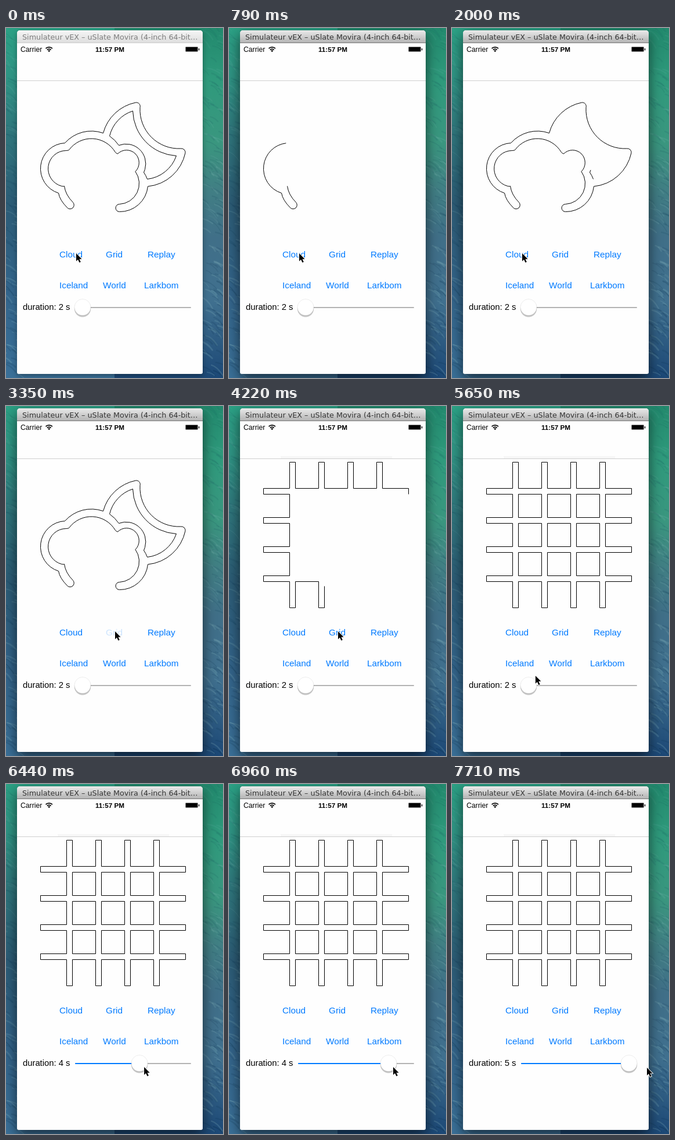
Write an HTML page that moves like this. It is 374 by 601 pixels and loops after 8000 ms.

```html
<!DOCTYPE html>
<html lang="fr">
<head>
<meta charset="utf-8">
<style>
html, body { margin: 0; width: 100%; height: 100%; overflow: hidden; background: #2a5574; }
svg { position: absolute; left: 0; top: 0; }
#win { position: absolute; left: 19px; top: 4px; width: 320px; height: 590px; border-radius: 5px 5px 3px 3px;
  background: #fefefe; box-shadow: 0 3px 9px rgba(0,0,0,.35); overflow: hidden; }
#bar { height: 21px; border-bottom: 1px solid #ccc; background: linear-gradient(#f6f6f6, #dedede); }
#win.active { box-shadow: 0 8px 22px rgba(0,0,0,.6); }
#win.active #bar { border-color: #777; background: linear-gradient(#eaeaea, #b4b4b4); }
text { font-family: "Liberation Sans", Arial, sans-serif; font-size: 15.3px; }
#title { font-family: "DejaVu Sans", sans-serif; font-size: 12.75px; }
#buttons { fill: #007aff; }
#cloud, #grid { fill: none; stroke: #000; }
</style>
</head>
<body>
<svg width="374" height="601">
  <defs>
    <linearGradient id="left" x2="0" y2="1">
      <stop stop-color="#2ba084"/><stop offset=".14" stop-color="#2f9484"/><stop offset=".3" stop-color="#2f767c"/>
      <stop offset=".5" stop-color="#2c5c76"/><stop offset=".75" stop-color="#33648a"/><stop offset="1" stop-color="#3a7098"/>
    </linearGradient>
    <linearGradient id="right" x2="0" y2="1">
      <stop stop-color="#22896d"/><stop offset=".15" stop-color="#2f9a7c"/><stop offset=".33" stop-color="#3a967f"/>
      <stop offset=".46" stop-color="#417f84"/><stop offset=".6" stop-color="#406f88"/><stop offset=".78" stop-color="#40708f"/>
      <stop offset="1" stop-color="#1c4876"/>
    </linearGradient>
  </defs>
  <rect width="187" height="601" fill="url(#left)"/>
  <rect x="187" width="187" height="601" fill="url(#right)"/>
  <g id="waves" fill="none" stroke-linecap="round"/>
</svg>
<div id="win"><div id="bar"></div></div>
<svg width="374" height="601">
  <text id="title" x="28" y="20">Simulateur vEX – uSlate Movira (4-inch 64-bit…</text>
  <text x="25" y="41" style="font-size:12.2px">Carrier</text>
  <g fill="none" stroke="#000" stroke-width="1.8">
    <path d="M68.5 35.2a8 8 0 0 1 11.4 0M70.8 37.6a4.8 4.8 0 0 1 6.8 0"/>
    <path d="M74.2 41.2l-2-2.2a3 3 0 0 1 4 0z" fill="#000" stroke="none"/>
  </g>
  <text x="154" y="41" style="font-size:11.7px;font-weight:bold">11:57 PM</text>
  <rect x="309.5" y="32.5" width="21" height="8" rx="1" fill="#000" stroke="#888"/>
  <rect x="331.7" y="35" width="1.6" height="3.4" fill="#222"/>
  <rect id="smudge" x="89" y="86" width="192" height="4" fill="#f7f7f7"/>
  <path d="M19 90.5h320" stroke="#cfcfcf"/>

  <g id="cloud" transform="translate(.5 .5)">
    <path d="M100 271Q102 286 115 299A6.5 6.5 0 0 1 105 308Q92 295 90 283A44 44 0 0 1 101 197A61 61 0 0 1 167 180
      A73 73 0 0 1 223 127.5A6.7 6.7 0 0 1 230.5 136A67 67 0 0 0 301 206.5A6.7 6.7 0 0 1 308.5 214A73 73 0 0 1 244 271.5
      A48.5 48.5 0 0 1 195 315A6.5 6.5 0 0 1 195 302A35.5 35.5 0 0 0 222.5 246A21.5 21.5 0 0 0 192 215.5
      Q190 215 188 213A48 48 0 0 0 108 209Q106 210 103 210A31 31 0 0 0 95.3 271Q99 272 100 271Z"/>
    <path d="M243 259A48.5 48.5 0 0 0 237 247.5L239 242A34 34 0 0 0 194 201A61 61 0 0 0 178 185A60 60 0 0 1 218 142
      A79.5 79.5 0 0 0 293 219A60 60 0 0 1 243 259Z"/>
  </g>
  <g id="grid"/>

  <g id="buttons">
    <text id="cloudBtn" x="92" y="394">Cloud</text>
    <text id="gridBtn" x="172" y="394">Grid</text>
    <text x="244" y="394">Replay</text>
    <text x="92" y="447">Iceland</text>
    <text x="167" y="447">World</text>
    <text x="238" y="447">Larkbom</text>
  </g>
  <text id="label" x="29" y="484" style="font-size:14.8px"></text>
  <rect x="119" y="479" width="200" height="2" rx="1" fill="#b4b4b4"/>
  <rect id="fill" x="119" y="479" height="2" rx="1" fill="#007aff"/>
  <g id="knob">
    <circle cy="482.5" r="14" fill="#000" opacity=".16"/>
    <circle cy="481" r="14.4" fill="#000" opacity=".1"/>
    <circle cy="479.5" r="14" fill="#fff" stroke="#000" stroke-opacity=".12" stroke-width=".6"/>
  </g>
  <path id="cursor" d="M0 0v13.5l3-2.9 2.4 5.2 2.4-1-2.4-5.1h4.2z" stroke="#fff" stroke-width="1.7" paint-order="stroke"/>
</svg>
<script>
const $ = id => document.getElementById(id);
const clamp = (v, lo, hi) => Math.min(hi, Math.max(lo, v));

function add(parent, attrs) {
  const el = document.createElementNS('http://www.w3.org/2000/svg', 'path');
  for (const k in attrs) el.setAttribute(k, attrs[k]);
  parent.append(el);
}

// Wallpaper ripples, seeded, stronger towards the bottom
let seed = 7;
const random = () => (seed = seed * 16807 % 2147483647) / 2147483647;
for (let i = 0; i < 300; i++) {
  const x = (i % 2 ? 332 : -12) + random() * 36, y = random() * 610 - 10;
  const run = 8 + random() * 16, drop = run * (.4 + random() * .6);
  add($('waves'), {
    d: `M${x} ${y}q${run * .6} ${drop * .2} ${run} ${drop}`,
    stroke: random() < .6 ? '#0b3450' : '#a4d4d4',
    'stroke-width': 1 + random() * 2,
    opacity: .06 + .12 * y / 600
  });
}

// Grid: one outline with four like sides, then nine cells by column
const side = (a, b) => {
  const [ax, ay] = a, [bx, by] = b;
  const stub = `l${ax * 45} ${ay * 45} ${bx * 10} ${by * 10} ${-ax * 45} ${-ay * 45}`;
  const gap = `l${bx * 40} ${by * 40}`;
  return [stub, stub, stub, stub].join(gap);
};
add($('grid'), {
  d: 'M309.5 151.5v-10h-45' + side([0, -1], [-1, 0]) + side([-1, 0], [0, 1]) +
     side([0, 1], [1, 0]) + 'l45 0 0 -10 -45 0' +
     'l0 -40 45 0 0 -10 -45 0'.repeat(2) + 'v-40Z'
});
for (let i = 0; i < 9; i++)
  add($('grid'), { d: `M${114.5 + 50 * (i / 3 | 0)} ${151.5 + 50 * (i % 3)}h40v40h-40z` });

function tracer(group) {
  const parts = [...group.children].map(el => ({ el, len: el.getTotalLength() }));
  const total = parts.reduce((sum, p) => sum + p.len, 0);
  return progress => {
    let left = clamp(progress, 0, 1) * total;
    for (const { el, len } of parts) {
      el.style.visibility = left > 0 ? 'visible' : 'hidden';
      el.style.strokeDasharray = left >= len - .01 ? 'none' : `${Math.max(left, 0)} 9999`;
      left -= len;
    }
  };
}
const traceCloud = tracer($('cloud')), traceGrid = tracer($('grid'));

// Pointer stops: time, x, y
const stops = [
  [0, 121, 387], [2630, 121, 387], [3300, 188, 387], [5400, 188, 387], [5650, 144, 463],
  [5810, 120, 485], [5990, 140, 487], [6050, 140, 487], [6440, 238, 486], [6900, 282, 486],
  [6960, 283, 486], [7140, 283, 486], [7710, 336, 487], [8000, 336, 487]
];
function pointer(t) {
  const i = stops.findIndex(s => s[0] > t);
  const [t0, x0, y0] = stops[i - 1], [t1, x1, y1] = stops[i];
  const k = (t - t0) / (t1 - t0);
  return [x0 + (x1 - x0) * k, y0 + (y1 - y0) * k];
}

// Button text returns from pale to full after release
const fade = (t, release) => clamp(.2 + .8 * (t - release) / 250, .2, 1);

function render(t) {
  const active = t >= 500, gridMode = t >= 3530;
  $('win').className = active ? 'active' : '';
  $('title').setAttribute('fill', active ? '#333' : '#7d7d7d');
  $('smudge').style.opacity = gridMode ? 1 : 0;

  traceCloud(gridMode ? 0 : active ? (t - 500) / 2000 : 1);
  traceGrid(gridMode ? (t - 3467) / 2000 : 0);
  $('cloudBtn').style.opacity = active ? fade(t, 500) : 1;
  $('gridBtn').style.opacity = t >= 3320 ? fade(t, 3530) : 1;

  const [x, y] = pointer(t);
  $('cursor').setAttribute('transform', `translate(${x} ${y})`);
  const knob = t < 6050 ? 132 : clamp(x - 8, 132, 305);
  $('knob').setAttribute('transform', `translate(${knob} 0)`);
  $('fill').setAttribute('width', knob - 119);
  $('label').textContent = `duration: ${Math.round(2 + 3 * (knob - 132) / 173)} s`;
}

const start = performance.now();
function tick() {
  render((performance.now() - start) % 8000);
  requestAnimationFrame(tick);
}
render(0);
requestAnimationFrame(tick);
</script>
</body>
</html>
```
